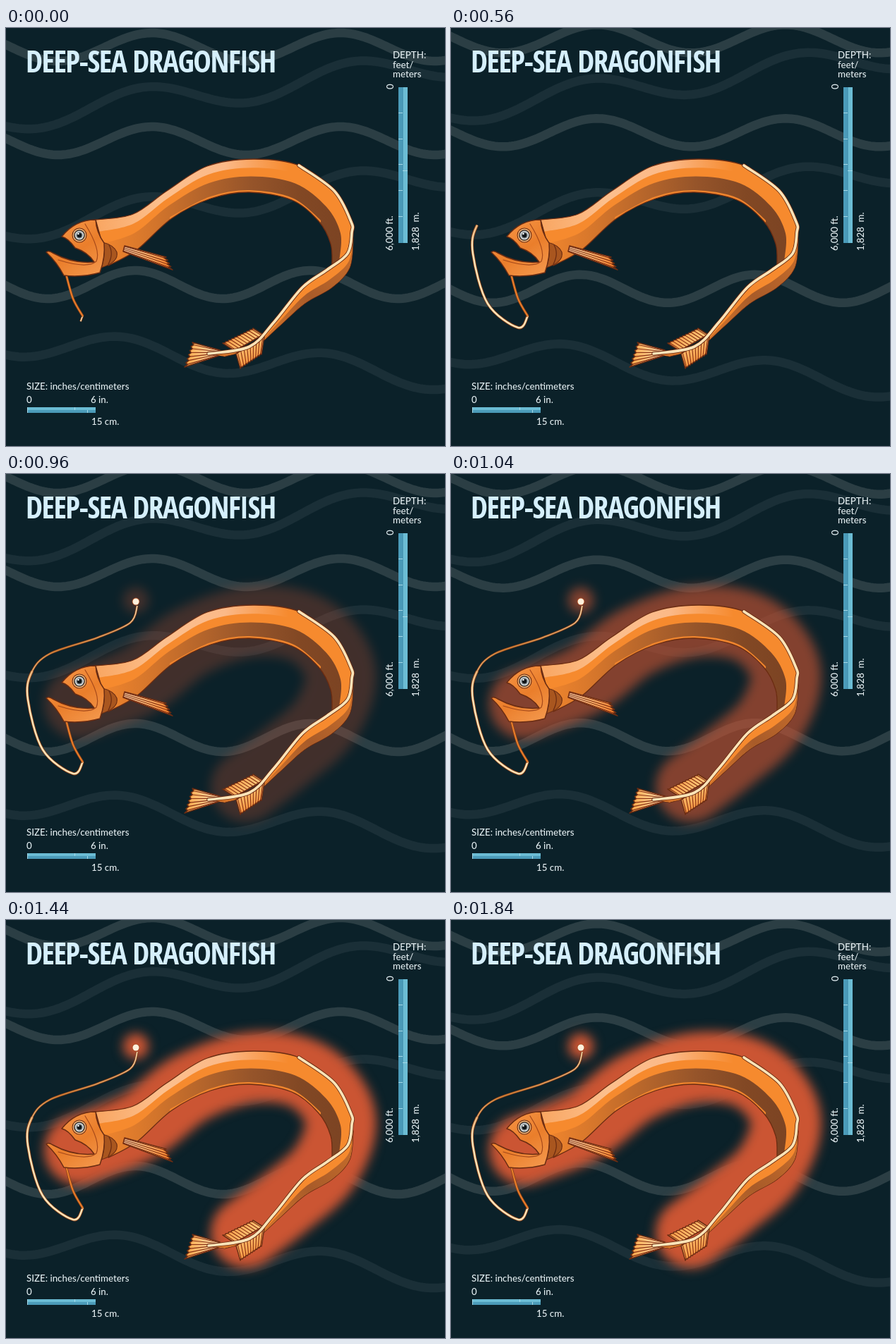
These frames come from a looping animation (622 px wide and 593 px high, 1.92 s). An HTML page with a canvas:

```html
<!DOCTYPE html>
<html lang="en">
<head>
<meta charset="utf-8">
<title>Deep-Sea Dragonfish</title>
<style>
html, body { margin: 0; width: 100%; height: 100%; overflow: hidden; background: #0b2129; }
canvas { display: block; }
</style>
</head>
<body>
<canvas id="stage" width="622" height="593"></canvas>
<script>
const W = 622, H = 593, LOOP = 1920, STEP = 80;
const stage = document.getElementById('stage').getContext('2d');
const DARK = '#6a2c12', CREAM = '#fde4b8', ORANGE = '#f68a2e', GLOW = '#cb5533';

const clamp = (x, lo, hi) => Math.max(lo, Math.min(hi, x));
// Point lists are flat: x, y, x, y ...
const mix = (a, b, k) => a.map((x, i) => x + (b[i] - x) * k);
const flip = v => v.map((_, i) => v[v.length - 2 - i + 2 * (i % 2)]);

function spline(v, p = new Path2D(), joined = false) {
  const n = v.length / 2;
  const at = i => { const k = 2 * clamp(i, 0, n - 1); return [v[k], v[k + 1]]; };
  if (joined) p.lineTo(v[0], v[1]); else p.moveTo(v[0], v[1]);
  for (let i = 0; i < n - 1; i++) {
    const [a, b, c, d] = [at(i - 1), at(i), at(i + 1), at(i + 2)];
    p.bezierCurveTo(b[0] + (c[0] - a[0]) / 6, b[1] + (c[1] - a[1]) / 6,
      c[0] - (d[0] - b[0]) / 6, c[1] - (d[1] - b[1]) / 6, c[0], c[1]);
  }
  return p;
}

// Area between two edges that run the same way.
function band(a, b) {
  const p = spline(flip(b), spline(a), true);
  p.closePath();
  return p;
}

function layer(draw) {
  const c = document.createElement('canvas');
  c.width = W; c.height = H;
  const g = c.getContext('2d');
  g.lineJoin = g.lineCap = 'round';
  draw(g);
  return c;
}

function ramp(g, x0, y0, x1, y1, ...cols) {
  const r = g.createLinearGradient(x0, y0, x1, y1);
  cols.forEach((c, i) => r.addColorStop(i / (cols.length - 1), c));
  return r;
}

function line(g, p, color, width) {
  g.strokeStyle = color;
  g.lineWidth = width;
  g.stroke(p);
}

function paint(g, p, fill, width = 1.2) {
  g.fillStyle = fill;
  g.fill(p);
  line(g, p, DARK, width);
}

function disc(g, x, y, r, color) {
  g.fillStyle = color;
  g.beginPath();
  g.arc(x, y, r, 0, 7);
  g.fill();
}

/* ---------- waves ---------- */
function wave(y, slope, peak, period) {
  const p = new Path2D();
  for (let x = -10; x <= W + 10; x += 4) {
    p.lineTo(x, y + slope * x - 20 * Math.cos(2 * Math.PI * (x - peak) / period));
  }
  return p;
}
const BRIGHT = '#2b3e44', DIM = '#1a2f37';
const waves = [
  { path: wave(128, -0.123, 195, 298), color: DIM, travel: -20 },
  { path: wave(284, -0.123, 195, 298), color: DIM, travel: -10 },
  { path: wave(445, 0.08, 162, 290), color: DIM, travel: 18 },
  { path: wave(27, 0, 207, 267), color: BRIGHT, travel: -20 },
  { path: wave(160, 0, 207, 267), color: BRIGHT, travel: -20 },
  { path: wave(364, 0, 183, 248), color: BRIGHT, travel: 10 }
];

/* ---------- fish ---------- */
// Paired edges: the bands of colour lie part of the way between them.
const back = [127, 272, 180, 264, 228, 231, 285, 196, 350, 186, 415, 195, 465, 231, 489, 275, 484, 320];
const belly = [145, 337, 185, 315, 235, 270, 290, 242, 345, 233, 405, 244, 443, 274, 460, 306, 462, 336];
const spine = [490, 290, 484, 320, 455, 343, 420, 368, 380, 417, 345, 452, 287, 462];
const under = [492, 300, 487, 340, 462, 368, 423, 391, 385, 425, 352, 453, 310, 466];
const core = [104, 326, 190, 292, 262, 238, 350, 209, 430, 222, 474, 280, 452, 350, 395, 402, 340, 444];
const head = new Path2D('M79 296Q98 272 127 272Q128 290 139 305Q141 325 133 347Q108 354 82 351' +
  'Q72 332 57 318Q60 315 66 319Q95 335 125 332Q116 318 98 312Q88 298 79 296Z');
const gill = new Path2D('M137 304Q142 318 135 340Q160 332 157 318Q153 308 137 304Z');

// Rayed fin from a base edge to a toothed outer edge.
function drawFin(g, base, outer, n, fill) {
  const shape = new Path2D(), rays = new Path2D();
  const on = (e, k) => mix(e.slice(0, 2), e.slice(2), k);
  shape.moveTo(base[2], base[3]);
  for (let i = 0; i <= 2 * n; i++) {
    const foot = on(base, i / (2 * n));
    const tip = mix(foot, on(outer, i / (2 * n)), i % 2 ? 0.93 : 1);
    if (!i) shape.lineTo(...foot);
    shape.lineTo(...tip);
    if (i % 2) { rays.moveTo(...foot); rays.lineTo(...tip); }
  }
  shape.closePath();
  paint(g, shape, fill, 1.5);
  line(g, rays, '#872f12', 1.1);
}

function fillIn(g, shape, draw) {
  g.save();
  g.clip(shape);
  draw();
  g.restore();
}

function drawBody(g) {
  const shape = band(back, belly);
  fillIn(g, shape, () => {
    g.fillStyle = ORANGE;
    g.fillRect(0, 0, W, H);
    g.fillStyle = ramp(g, 130, 0, 400, 0, '#f9a763', '#fcbf8d', '#fbb988', ORANGE);
    g.fill(band(back, mix(back, belly, 0.26)));
    g.fillStyle = ramp(g, 145, 0, 485, 0, '#ec832d', '#d2742b', '#b3642b', '#95542a', '#824824', '#7b4323');
    g.fill(band(mix(back, belly, 0.52), belly));
    line(g, spline(belly.slice(4, 14)), '#f0852d', 6);
  });
  line(g, shape, DARK, 1.3);
}

function drawTail(g) {
  const shape = band(spine, under);
  paint(g, shape, ORANGE);
  fillIn(g, shape, () => {
    g.fillStyle = ramp(g, 370, 440, 490, 320, '#d4752b', '#a85b29', '#c56c2b');
    g.fill(band(mix(spine, under, 0.55), under));
  });
}

function drawHead(g) {
  paint(g, gill, '#a9561f');
  line(g, new Path2D('M146 308Q153 320 145 335'), DARK, 1.2);
  paint(g, head, ramp(g, 80, 280, 125, 350, '#f59242', '#ea7e2b', '#f3964a'), 1.5);
  line(g, new Path2D('M112 278Q135 315 128 331Q115 342 74 329'), '#a5491a', 1.2);
  const eye = ['#f3b274', '#3b3431', '#d6dcdd', '#7d878b', '#101518'];
  disc(g, 104, 294, 10.5, DARK);
  eye.forEach((c, i) => disc(g, 104, 294, 9.4 - 1.55 * i, c));
  disc(g, 102.5, 292, 1.2, '#fff');
}

const fish = layer(g => {
  drawFin(g, [303, 457, 301, 465], [264, 446, 253, 481], 6, ramp(g, 254, 0, 302, 0, '#f9a545', CREAM));
  drawFin(g, [324, 458, 364, 435], [307, 447, 350, 426], 10, ramp(g, 310, 430, 340, 455, '#f7923a', '#fdc476'));
  drawBody(g);
  drawTail(g);
  drawFin(g, [326, 462, 366, 437], [332, 483, 362, 463], 9, ramp(g, 330, 450, 345, 480, '#fdc476', '#f7923a'));
  const stripe = spline([...back.slice(10, 16), ...spine]);
  line(g, stripe, DARK, 5.4);
  line(g, stripe, CREAM, 3.7);
  drawHead(g);
  drawFin(g, [166, 317, 168, 309], [236, 343, 227, 325], 4, ramp(g, 166, 311, 232, 336, '#fde6c0', '#fbb870', '#f4812a'));
});

const glow = layer(g => {
  g.filter = 'blur(8px)';
  line(g, spline(core), GLOW, 100);
  disc(g, 184, 179, 18, GLOW);
});

/* ---------- labels ---------- */
function drawTitle(g) {
  const title = 'DEEP-SEA DRAGONFISH';
  const faces = ['Noto Sans', 'Open Sans Condensed', 'Open Sans', 'Roboto Condensed', 'Roboto'];
  const font = (f, px) => `600 ${px}px "${f}", sans-serif`;
  g.fontStretch = 'extra-condensed';
  g.letterSpacing = '-1.5px';
  const width = f => { g.font = font(f, 40); return g.measureText(title).width; };
  const slim = faces.reduce((a, b) => width(b) < width(a) ? b : a);
  const size = Math.min(56, 40 * 352 / width(slim));
  g.font = font(slim, size.toFixed(1));
  g.fillStyle = '#d5effc';
  g.fillText(title, 28, 48 + size * 0.357);
  g.fontStretch = 'normal';
  g.letterSpacing = '0px';
}

const labels = layer(g => {
  drawTitle(g);
  const text = (s, x, y, turn = 0) => {
    g.save();
    g.translate(x, y);
    g.rotate(turn);
    g.font = '500 13.3px Lato, sans-serif';
    g.fillStyle = '#e3edf0';
    g.fillText(s, 0, 0);
    g.restore();
  };
  const UP = -Math.PI / 2;
  ['DEPTH:', 'feet/', 'meters'].forEach((s, i) => text(s, 548, 43 + 13.5 * i));
  text('0', 549, 87, UP);
  text('6,000 ft.', 548, 316, UP);
  text('1,828  m.', 585, 316, UP);
  text('SIZE: inches/centimeters', 29, 513);
  text('0', 29, 532);
  text('6 in.', 120, 532);
  text('15 cm.', 121, 563);

  const box = (x, y, w, h, c) => { g.fillStyle = c; g.fillRect(x, y, w, h); };
  const LIGHT = '#6bbcd4', DEEP = '#4b9bb9', TICK = '#a5d8e6';
  box(556, 84, 6, 221, DEEP);
  box(562, 84, 7, 221, LIGHT);
  box(561.5, 84, 1, 221, '#3d88a5');
  for (let i = 1; i < 6; i++) box(556, 83 + Math.round(36.8 * i), 6, 1, TICK);
  box(562, 202, 7, 1, TICK);
  box(30, 538, 97, 4, LIGHT);
  box(30, 542, 97, 4, DEEP);
  box(30, 538, 1, 8, TICK);
  box(97, 538, 1, 4, TICK);
  box(115, 542, 1, 4, TICK);
});

/* ---------- barbel ---------- */
const root = spline([85, 349, 95, 384, 109, 409]);
const barbel = spline([109, 408, 95, 425, 52, 391, 31, 320, 36, 282, 62, 255, 130, 232, 176, 211, 186, 187]);
const THICK = 196, FULL = 390;
const tint = ramp(stage, 0, 425, 0, 190, CREAM, CREAM, CREAM, '#d28238', CREAM);

function strand(path, length, color, width) {
  stage.setLineDash([length, 999]);
  line(stage, path, '#8a4218', width + 1.6);
  line(stage, path, color, width);
  stage.setLineDash([]);
}

function drawBarbel(t) {
  // Creeps at first, then whips out at a steady speed.
  const len = Math.min(FULL, Math.max(9 + 0.07 * t, 0.53 * t - 101));
  strand(barbel, len, tint, 1.5);
  if (len > 20) strand(barbel, Math.min(len, THICK), tint, 2.5);
  strand(root, 99, '#ea7f2b', 2);
  if (len === FULL) {
    disc(stage, 184, 181, 5.4, '#a8481f');
    disc(stage, 184, 181, 4.5, '#fdf0dc');
  }
}

function render(t) {
  const g = stage;
  g.fillStyle = '#0b2129';
  g.fillRect(0, 0, W, H);
  const bob = 1 - Math.abs(t / (LOOP / 2) - 1);
  for (const w of waves) {
    g.save();
    g.translate(0, w.travel * bob);
    line(g, w.path, w.color, 12.5);
    g.restore();
  }
  g.globalAlpha = Math.pow(clamp((t - 880) / 240, 0, 1), 1.15);
  g.drawImage(glow, 0, 0);
  g.globalAlpha = 1;
  drawBarbel(t);
  g.drawImage(fish, 0, 0);
  g.drawImage(labels, 0, 0);
}

const start = performance.now();
function tick() {
  const t = (performance.now() - start) % LOOP;
  render(Math.floor(t / STEP) * STEP);
  requestAnimationFrame(tick);
}
tick();
</script>
</body>
</html>
```
